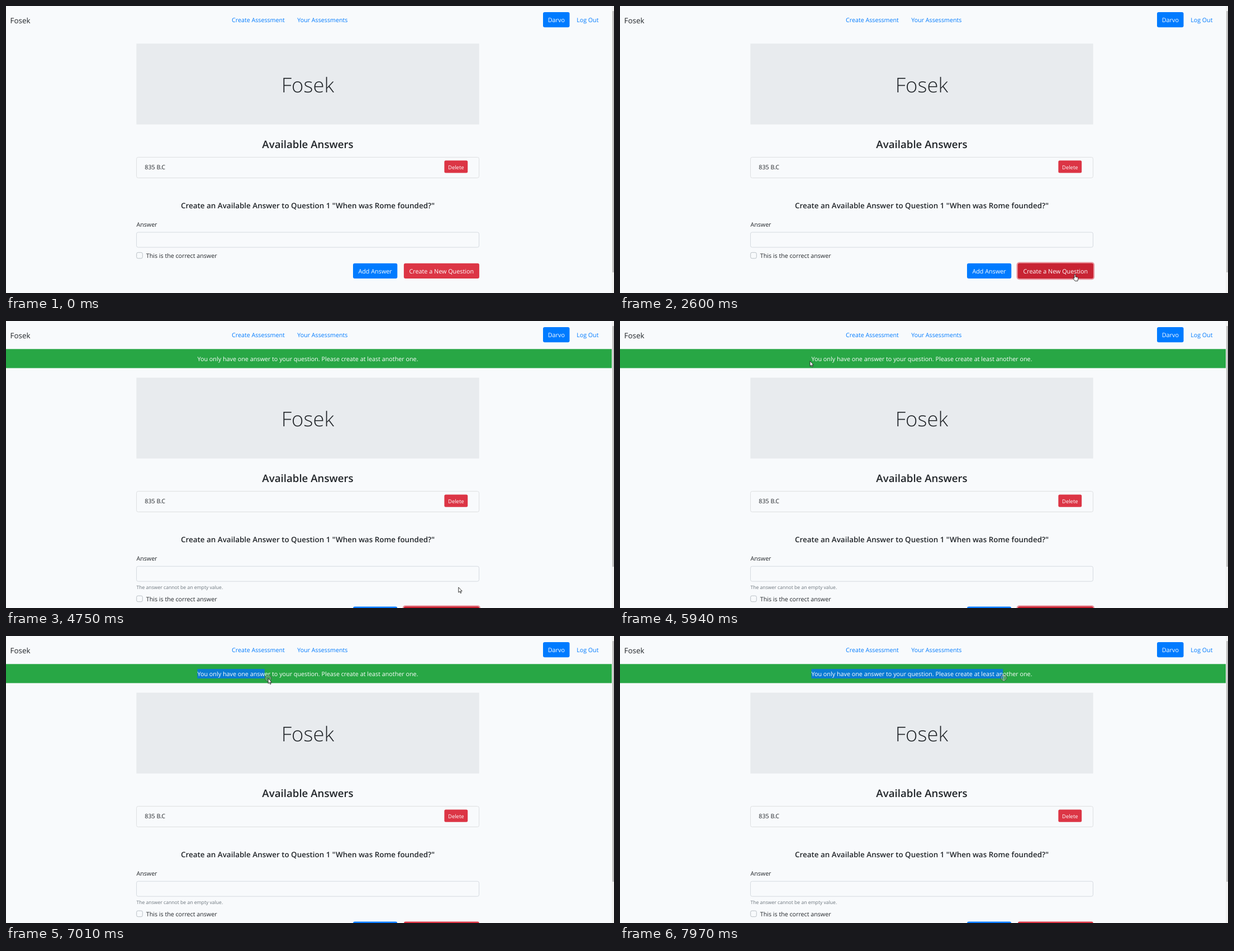
Recreate the animation shown at these times as an HTML page. Size 1088x515 px, loop 8000 ms.

```html
<!DOCTYPE html>
<html lang="en">
<head>
<meta charset="utf-8">
<title>Available Answers</title>
<style>
  html, body { margin: 0; width: 100%; height: 100%; overflow: hidden; background: #f8fafc; }
  svg { display: block; }
  text {
    font: 10.7px "Open Sans", "Noto Sans", sans-serif;
    fill: #212529;
    text-rendering: geometricPrecision;
  }
  .mid { text-anchor: middle; }
  .link { fill: #007bff; }
  .btn { fill: #fff; font-size: 10.8px; text-anchor: middle; }
  .brand { font-size: 13.4px; }
  .display { font-size: 36.5px; font-weight: 300; }
  .h3 { font-size: 18.7px; font-weight: 600; }
  .h5 { font-size: 13.43px; font-weight: 600; }
  .small { font-size: 8.64px; fill: #6c757d; }
  .blue { fill: #007bff; }
  .red { fill: #dc3545; }
  .field { fill: none; stroke: #d5dae0; }
  .icon { fill: #fff; stroke: #222; stroke-width: .9; }
</style>
</head>
<body>
<svg width="1088" height="515" viewBox="0 0 1088 515">
  <rect width="1088" height="515" fill="#f8fafc"/>

  <text class="brand" x="7.5" y="31">Fosek</text>
  <text class="link mid" x="451.5" y="29">Create Assessment</text>
  <text class="link mid" x="566.3" y="29">Your Assessments</text>
  <rect class="blue" x="961" y="11" width="47.5" height="27.2" rx="3"/>
  <text class="btn" x="984.8" y="29">Darvo</text>
  <text class="link mid" x="1040.8" y="29">Log Out</text>

  <g id="alert">
    <rect y="50.3" width="1084" height="34.2" fill="#28a745"/>
    <rect id="sel" y="59.2" width="0" height="17" fill="#0b7bd3"/>
    <text id="msg" class="mid" x="540" y="72" style="fill:#fff;font-size:10.78px">You only have one answer to your question. Please create at least another one.</text>
  </g>

  <g id="page">
    <rect x="233.3" y="67.5" width="613.4" height="145" fill="#e8ebee"/>
    <text class="display mid" x="540" y="154.5">Fosek</text>
    <text class="h3 mid" x="540" y="255">Available Answers</text>
    <rect x="233.5" y="271.4" width="613" height="37" rx="3" fill="none" stroke="#dddfe1"/>
    <text x="248.3" y="293">835 B.C</text>
    <rect class="red" x="784.4" y="277.3" width="41.8" height="22.2" rx="2.5"/>
    <text class="btn" x="805.3" y="292.5" style="font-size:9.5px">Delete</text>
    <text class="h5 mid" x="540" y="362.7">Create an Available Answer to Question 1 "When was Rome founded?"</text>
    <text x="233.4" y="396">Answer</text>
    <rect class="field" x="233.5" y="406" width="613" height="27" rx="3"/>
    <text id="hint" class="small" x="233.4" y="446.5">The answer cannot be an empty value.</text>
    <g id="form">
      <rect class="field" x="233.7" y="442.3" width="10.6" height="10.6" rx="2.5" style="stroke:#b9c0c6"/>
      <text x="250.8" y="452">This is the correct answer</text>
      <rect class="blue" x="621" y="461.8" width="79.3" height="27.2" rx="3"/>
      <text class="btn" x="660.6" y="479.5">Add Answer</text>
      <rect id="focus" class="red" x="709.6" y="459.5" width="139.6" height="31.8" rx="5"/>
      <rect class="red" x="711.9" y="461.8" width="135" height="27.2" rx="3"/>
      <rect id="shade" x="711.9" y="461.8" width="135" height="27.2" rx="3" fill="#c82333"/>
      <text class="btn" x="779.3" y="479.5">Create a New Question</text>
    </g>
  </g>

  <rect x="1084" width="4" height="515" fill="#f1f1f1"/>
  <rect id="thumb" x="1085" y="9" width="3" fill="#c1c1c1"/>

  <g id="cursor">
    <g id="ring" fill="none">
      <circle r="5.4" fill="#999" fill-opacity=".3" stroke="#333" stroke-opacity=".75"/>
      <circle r="4.6" stroke="#fff" stroke-opacity=".45" stroke-width=".7"/>
    </g>
    <path id="arrow" class="icon" d="M0 0V9.2L2.1 7.3L3.6 10.6L5 10L3.6 6.8H6.4Z"/>
    <path id="hand" class="icon" d="M-1 1Q0 -.7 1.1 1V5L4.5 5.8Q6 6.2 5.8 8L5 12.4H.2L-3.2 8Q-3.5 6.2 -1 7.4Z"/>
    <path id="beam" d="M-1.6 -4.8H1.6M0 -4.8V4.8M-1.6 4.8H1.6" fill="none" stroke="#dfe7ee" stroke-width=".8" stroke-opacity=".7"/>
  </g>
</svg>
<script>
const LOOP = 8000, ENTER = 680, PRESS = 2450, RELEASE = 2570, UPDATE = 2720, DRAG = 6290;
const FADE = 150;
const $ = id => document.getElementById(id);
const show = (id, on) => $(id).setAttribute("visibility", on ? "inherit" : "hidden");
const ramp = (t, from) => Math.min(1, Math.max(0, (t - from) / FADE));

// Pointer path: time, x, y
const path = [
  [680, 1000, 508], [930, 880, 490], [1180, 814, 481], [4720, 814, 481],
  [4750, 810, 478], [5000, 655, 432], [5230, 435, 329], [5550, 352, 112],
  [5760, 343, 84], [5940, 340, 72], [6090, 339.5, 65], [6290, 339.5, 65],
  [6640, 398, 72], [7010, 469, 76], [7070, 478, 77], [7500, 581, 81],
  [7910, 679, 76], [8000, 690, 74.5]
];

const slope = (i, k) => (path[i + 1][k] - path[i][k]) / (path[i + 1][0] - path[i][0]);

// Tangent at a key; zero where the direction turns or rests
function tangent(i, k) {
  const last = path.length - 1;
  const a = slope(Math.max(i - 1, 0), k), b = slope(Math.min(i, last - 1), k);
  return a * b > 0 ? 2 * a * b / (a + b) : 0;
}

function pointer(t) {
  if (t <= path[0][0]) return path[0].slice(1);
  const i = path.findIndex(p => p[0] > t) - 1;
  const p = path[i], q = path[i + 1], d = q[0] - p[0], u = (t - p[0]) / d;
  return [1, 2].map(k => {
    const s = u * u * (3 - 2 * u);
    return p[k] + (q[k] - p[k]) * s
      + d * u * (1 - u) * ((1 - u) * tangent(i, k) - u * tangent(i + 1, k));
  });
}

const msg = $("msg"), edges = [];
for (let i = 0; i < msg.getNumberOfChars(); i++) edges.push(msg.getStartPositionOfChar(i).x);

function selectTo(x) {
  const end = edges.reduce((a, b) => Math.abs(b - x) < Math.abs(a - x) ? b : a);
  $("sel").setAttribute("x", edges[0]);
  $("sel").setAttribute("width", end - edges[0]);
}

function draw(t) {
  const [x, y] = pointer(t);
  const updated = t >= UPDATE, dragging = t >= DRAG;
  const focus = ramp(t, PRESS) - ramp(t, DRAG);
  const over = t >= ENTER && !updated && x > 712 && x < 847 && y > 462 && y < 489;
  const onText = updated && x >= 342 && x < 738 && y > 59 && y < 75.8;

  show("alert", updated);
  show("hint", updated);
  $("page").setAttribute("transform", `translate(0 ${updated ? 34.2 : 0})`);
  $("form").setAttribute("transform", `translate(0 ${updated ? 16.6 : 0})`);
  $("thumb").setAttribute("height", updated ? 432 : 469);
  $("shade").setAttribute("opacity", over ? 1 : focus);
  $("focus").setAttribute("opacity", focus / 2);

  show("cursor", t >= ENTER);
  $("cursor").setAttribute("transform", `translate(${x} ${y})`);
  show("hand", over);
  show("beam", onText);
  show("arrow", !over && !onText);
  show("ring", dragging || (t >= PRESS && t < RELEASE));
  selectTo(dragging ? pointer(t - 30)[0] : 0);
}

const start = performance.now();
function tick() {
  draw((performance.now() - start) % LOOP);
  requestAnimationFrame(tick);
}
tick();
</script>
</body>
</html>
```
